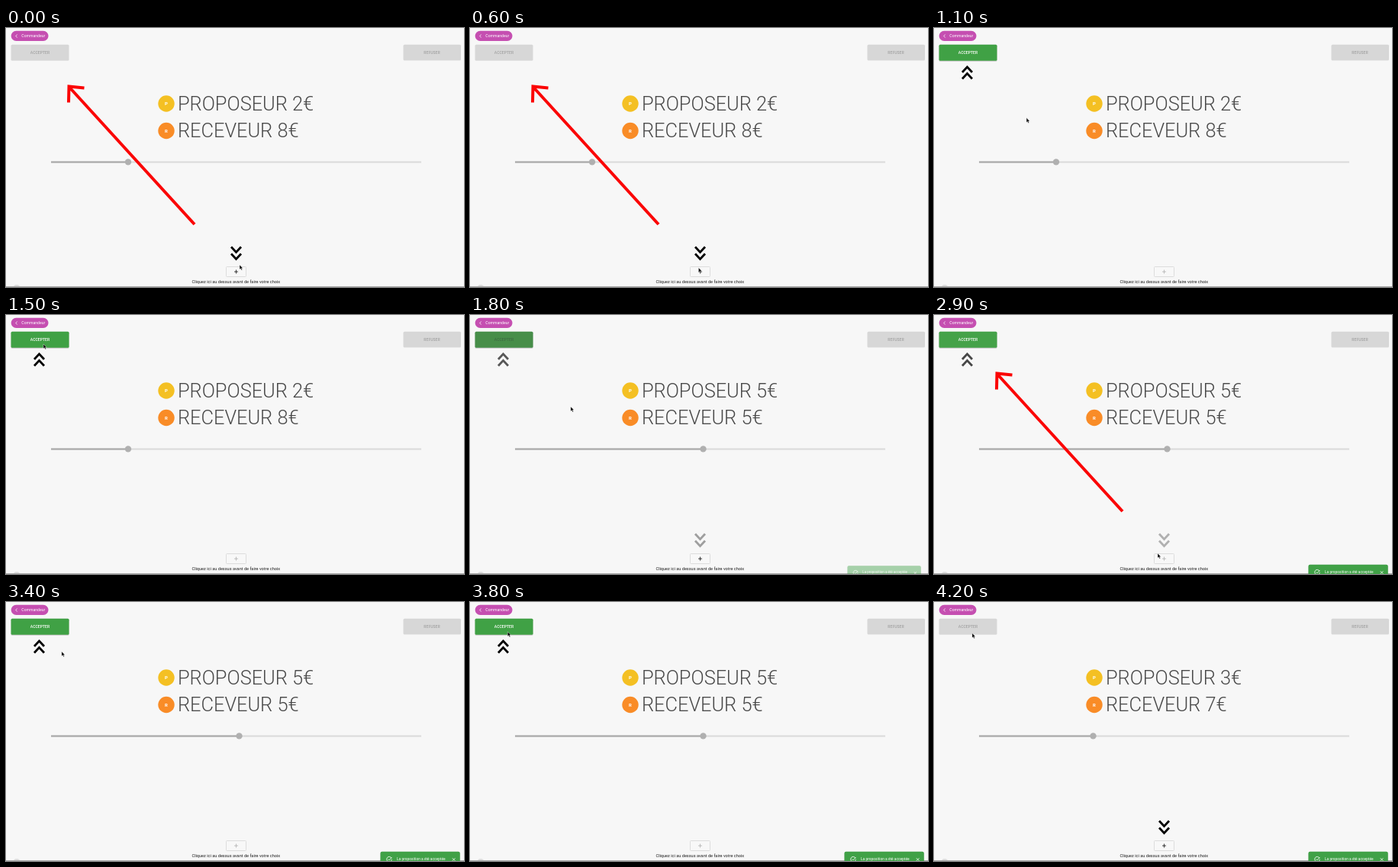
Recreate the animation shown at these times as an HTML page. Size 600 by 339 pixels, loop 4300 ms.

```html
<!DOCTYPE html>
<html lang="fr">
<head>
<meta charset="utf-8">
<title>Proposition</title>
<style>
  html, body { margin: 0; width: 100%; height: 100%; overflow: hidden; background: #f7f7f7; }
  svg { display: block; width: 600px; height: 339px; font-family: Roboto, sans-serif; }
  .offer { font-size: 25.35px; font-weight: 300; fill: #484848; }
  .label { font-size: 5.1px; font-weight: 500; text-anchor: middle; }
  .badge { font-size: 6px; font-weight: 700; text-anchor: middle; fill: #fff; }
  .chevron { fill: none; stroke: #000; stroke-width: 2.8; }
  .thin { fill: none; stroke: #fff; stroke-width: .8; }
</style>
</head>
<body>
<svg viewBox="0 0 600 339">
  <defs>
    <filter id="shadow" x="-10%" y="-20%" width="120%" height="150%">
      <feDropShadow dx="0" dy=".6" stdDeviation=".7" flood-opacity=".35"/>
    </filter>
  </defs>
  <rect width="600" height="339" fill="#f7f7f7"/>
  <circle cx="14" cy="341" r="5" fill="#ddd"/>
  <rect y="338" width="600" height="1" fill="#a9a9a9"/>

  <rect x="6.7" y="3.8" width="48.8" height="13.2" rx="6.6" fill="#c54fb1"/>
  <path class="thin" d="M14.6 8.5l-1.8 2 1.8 2"/>
  <text class="label" x="35.8" y="12.2" fill="#fff" style="font-weight:400">Commandeur</text>

  <rect id="accept" x="6.6" y="21.8" width="75.9" height="21" rx="1.5"/>
  <text id="acceptText" class="label" x="44.5" y="33.8">ACCEPTER</text>
  <rect x="520.5" y="21.8" width="75.5" height="20.8" rx="1.5" fill="#d7d7d7"/>
  <text class="label" x="558" y="33.8" fill="#a3a3a3">REFUSER</text>

  <circle cx="210" cy="99" r="10.7" fill="#f4c023"/>
  <text class="badge" x="210" y="101">P</text>
  <text id="giver" class="offer" x="225" y="107.7"></text>
  <circle cx="210" cy="134.5" r="10.7" fill="#f98c27"/>
  <text class="badge" x="210" y="136.5">R</text>
  <text id="taker" class="offer" x="225" y="143.2"></text>

  <rect x="59" y="174.5" width="485" height="2" fill="#dadada"/>
  <rect id="filled" x="59" y="174.5" height="2" fill="#a8a8a8"/>
  <circle id="thumb" cy="175.4" r="4.2" fill="#b0b0b0"/>

  <path id="up" class="chevron" d="M37 58l6.5-7 6.5 7M37 66.5l6.5-7 6.5 7"/>
  <path id="down" class="chevron" d="M295 286.5l6.5 7 6.5-7M295 295.5l6.5 7 6.5-7"/>

  <rect x="288.5" y="312.5" width="26" height="13" rx="1" fill="#f8f8f8" stroke="#d6d6d6" stroke-width=".8"/>
  <path id="plus" d="M299 319h5M301.5 316.5v5" stroke-width=".9"/>
  <text x="301.3" y="333.8" font-size="5.58" text-anchor="middle" fill="#1c1c1c">Cliquez ici au dessus avant de faire votre choix</text>

  <g id="toast">
    <rect x="490.5" y="326.8" width="104.2" height="38" rx="2" fill="#41a146" filter="url(#shadow)"/>
    <path class="thin" d="M505 335.3a3.3 3.3 0 1 0 .3 1.5M500.4 336.6l1.4 1.4 3.6-3.8"/>
    <text x="512" y="337.8" font-size="4.85" fill="#fff">La proposition a été acceptée</text>
    <path class="thin" d="M584.8 335.2l3.6 3.6m0-3.6l-3.6 3.6"/>
  </g>

  <path id="pointer" d="M247 257L83 77.5M102.5 78.5L82.5 76.5 82 97.5" fill="none" stroke="#fb0404" stroke-width="4"/>
  <path id="cursor" d="M0 0v6l1.4-1.2 1 2.2 1.1-.5-1-2.1h1.8z" fill="#000" stroke="#fff" stroke-width=".4"/>
</svg>
<script>
const LOOP = 4300, STEP = 100;
const GREY = [215, 215, 215], GREEN = [65, 161, 69], DARK = [63, 139, 67];

// Each round: the plus button is clicked at arm, ACCEPTER at send.
const rounds = [{ arm: 600, send: 1700 }, { arm: 2800, send: 3900 }];
const shares = [2, 5, 3];

// Places where the mouse stops: time, x, y.
const stops = [
  [0, 306, 310], [700, 299, 314], [1320, 49, 38], [1560, 49, 38],
  [2200, 311, 297], [2900, 293, 312], [3520, 49, 38], [LOOP, 50, 41]
];

const $ = id => document.getElementById(id);
const set = (id, attrs) => {
  for (const name in attrs) $(id).setAttribute(name, attrs[name]);
};
const fade = (t, from, length) => Math.min(1, Math.max(0, (t - from) / length));
const smooth = p => p * p * (3 - 2 * p);
const mix = (a, b, p) => a.map((v, i) => v + (b[i] - v) * p);

function mouse(t) {
  const i = stops.findIndex(stop => stop[0] > t);
  const [from, ...a] = stops[i - 1], [to, ...b] = stops[i];
  return mix(a, b, smooth((t - from) / (to - from)));
}

function render(t) {
  const sent = rounds.filter(r => t >= r.send).length;
  const share = shares[sent];
  const x = 63 + 48.5 * share;
  $('giver').textContent = `PROPOSEUR ${share}€`;
  $('taker').textContent = `RECEVEUR ${10 - share}€`;
  set('filled', { width: x - 59 });
  set('thumb', { cx: x });

  const ready = rounds.reduce((sum, r) => sum + fade(t, r.arm, 140) - fade(t, r.send, 280), 0);
  const active = rounds.some(r => t > r.arm && t <= r.send);
  const leaving = ready > 0 && !active;
  const fill = mix(GREY, leaving ? DARK : GREEN, 1 - (1 - ready) ** 3);
  set('accept', { fill: `rgb(${fill})`, filter: ready > 0 ? 'url(#shadow)' : 'none' });
  set('acceptText', { fill: active ? '#fff' : leaving ? '#3d6c41' : '#a3a3a3' });
  set('plus', { stroke: active ? '#b5b5b5' : '#222' });
  set('up', { opacity: ready });
  set('down', { opacity: 1 - ready });

  const shown = fade(t, rounds[0].send, 230);
  set('toast', {
    opacity: shown,
    transform: `translate(542.6 346) scale(${.865 + .135 * shown}) translate(-542.6 -346)`
  });

  const next = rounds[sent];
  const waited = sent ? t - rounds[sent - 1].send : LOOP;
  set('pointer', { opacity: next && t < next.arm + 200 && waited >= 400 ? 1 : 0 });
  set('cursor', { transform: `translate(${mouse(t)})` });
}

const start = performance.now();
function tick() {
  const t = Math.max(0, performance.now() - start) % LOOP;
  render(Math.floor(t / STEP) * STEP);
  requestAnimationFrame(tick);
}
render(0);
requestAnimationFrame(tick);
</script>
</body>
</html>
```
